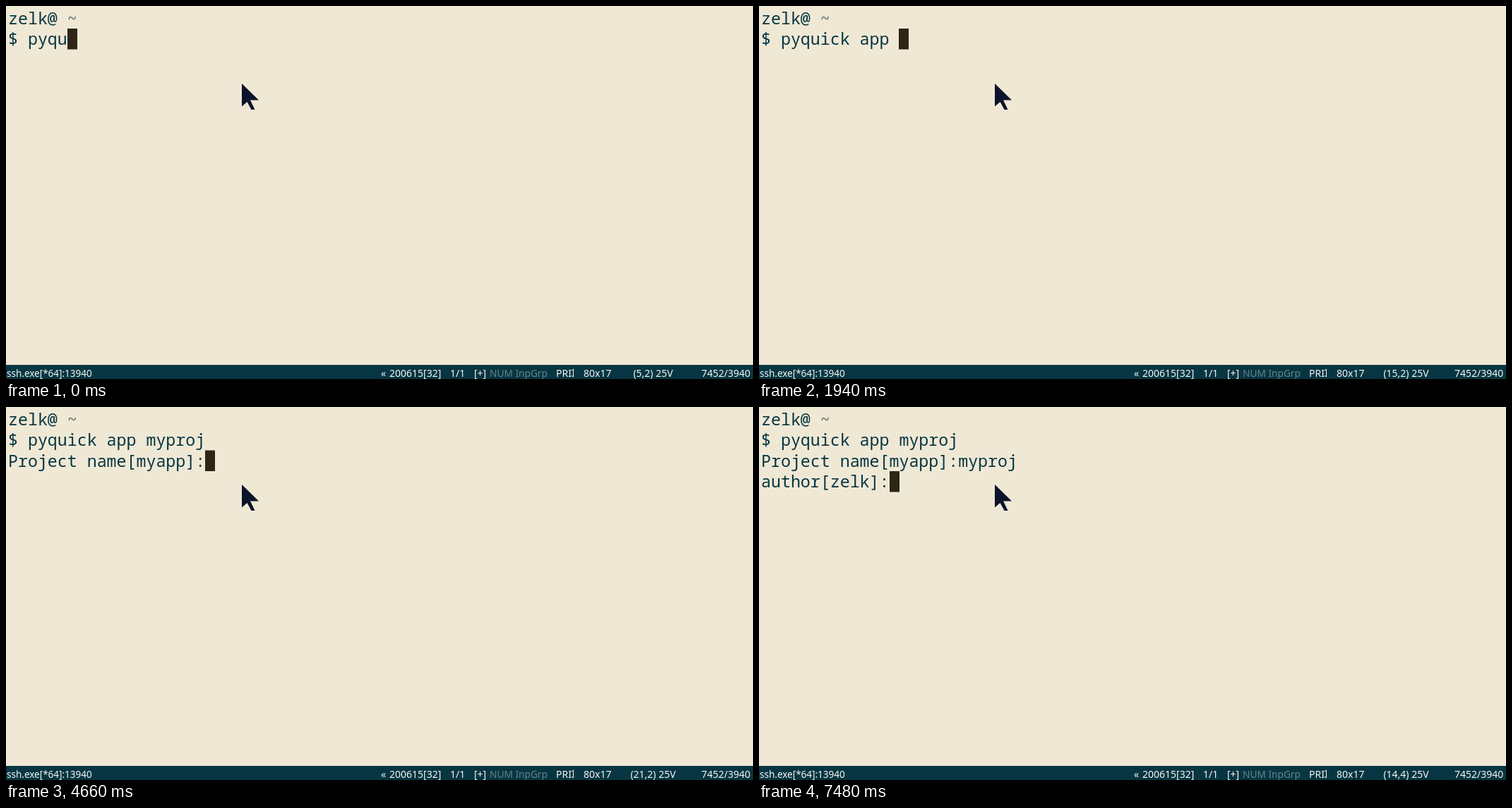
Write an HTML page that moves like this. It is 1058 px wide and 529 px high and loops after 8000 ms.

```html
<!DOCTYPE html>
<html lang="en">
<head>
<meta charset="utf-8">
<title>Terminal session</title>
<style>
  html, body { margin: 0; width: 100%; height: 100%; overflow: hidden; background: #efe8d5; }
  svg { display: block; width: 100vw; height: 100vh; }
  text { white-space: pre; }
  #terminal { font: 23.27px "Noto Sans Mono", monospace; fill: #073642; }
  #bar { font: 300 14px "Noto Sans", "Open Sans", sans-serif; fill: #f4f6f3; }
  #bar .dim { fill: #64838a; }
</style>
</head>
<body>
<svg viewBox="0 0 1058 529" preserveAspectRatio="none">
  <rect width="1058" height="529" fill="#efe8d5"/>
  <g id="terminal">
    <text x="3" y="25.5">zelk@ <tspan fill="#586e75">~</tspan></text>
  </g>
  <rect id="cursor" width="14" height="29.5" fill="#2d2616"/>
  <path d="M334 110V142.5L341.5 136L347.5 147H352.5L346 133.5H358Z" fill="#0c142b"/>
  <rect y="509" width="1058" height="20" fill="#073642"/>
  <g id="bar">
    <text x="1" y="526" font-size="13.5" style="font-size:13.5px">ssh.exe[*64]:13940</text>
    <text x="531" y="526">«</text>
    <text x="543" y="526">200615[32]</text>
    <text x="629" y="526">1/1</text>
    <text x="663" y="526">[+]</text>
    <text class="dim" x="685" y="526" style="font-size:13.7px">NUM InpGrp</text>
    <text x="779" y="526">PRI</text>
    <path d="M801 517L803.5 515V526L801 524" fill="none" stroke="#f4f6f3"/>
    <text x="818" y="526">80x17</text>
    <text id="position" x="916.5" y="526" text-anchor="middle"></text>
    <text x="985" y="526">7452/3940</text>
  </g>
</svg>
<script>
const LOOP = 8000, LEFT = 3, CELL = 13.962, ROW = 29.5;
const lines = ["$ pyquick app myproj", "Project name[myapp]:myproj", "author[zelk]:"];

// time, active line, typed columns, position readout, cursor visible
const steps = [
  [0, 0, 6, "5,2", 1],
  [150, 0, 7, "7,2", 1],
  [380, 0, 8, "8,2", 1],
  [850, 0, 9, "10,2", 1],
  [1080, 0, 10, "11,2", 1],
  [1470, 0, 11, "11,2", 1],
  [1550, 0, 12, "12,2", 1],
  [1700, 0, 13, "13,2", 1],
  [1780, 0, 13, "14,2", 1],
  [1940, 0, 14, "15,2", 1],
  [2480, 0, 14, "15,2", 0],
  [3030, 0, 14, "15,2", 1],
  [3270, 0, 15, "16,2", 1],
  [3420, 0, 16, "17,2", 1],
  [3810, 0, 17, "18,2", 1],
  [3960, 0, 18, "18,2", 1],
  [4040, 0, 19, "18,2", 1],
  [4270, 0, 20, "20,2", 1],
  [4350, 0, 20, "21,2", 1],
  [4580, 1, 0, "21,2", 1],
  [4660, 1, 20, "21,2", 1],
  [4970, 1, 20, "21,3", 1],
  [5210, 1, 21, "22,3", 1],
  [5440, 1, 22, "22,3", 1],
  [5520, 1, 22, "23,3", 1],
  [5680, 1, 23, "24,3", 1],
  [5760, 1, 24, "24,3", 1],
  [5910, 1, 25, "26,3", 1],
  [6000, 1, 26, "27,3", 1],
  [6390, 2, 13, "27,3", 1],
  [6550, 2, 13, "14,4", 1],
  [6940, 2, 13, "14,4", 0],
  [7480, 2, 13, "14,4", 1]
];

const terminal = document.getElementById("terminal");
const cursor = document.getElementById("cursor");
const position = document.getElementById("position");
const rows = lines.map((_, i) => {
  const row = document.createElementNS("http://www.w3.org/2000/svg", "text");
  row.setAttribute("x", LEFT);
  row.setAttribute("y", 55 + i * ROW);
  return terminal.appendChild(row);
});

let shown;
function draw(step) {
  if (step === shown) return;
  shown = step;
  const [, active, column, readout, visible] = step;
  rows.forEach((row, i) => {
    row.textContent = i < active ? lines[i] : i === active ? lines[i].slice(0, column) : "";
  });
  cursor.setAttribute("x", Math.round(LEFT + column * CELL));
  cursor.setAttribute("y", 32 + active * ROW);
  cursor.setAttribute("visibility", visible ? "visible" : "hidden");
  position.textContent = `(${readout}) 25V`;
}

const start = performance.now();
function tick() {
  const time = (performance.now() - start) % LOOP;
  draw(steps.findLast(step => step[0] <= time) || steps[0]);
  requestAnimationFrame(tick);
}
tick();
</script>
</body>
</html>
```
